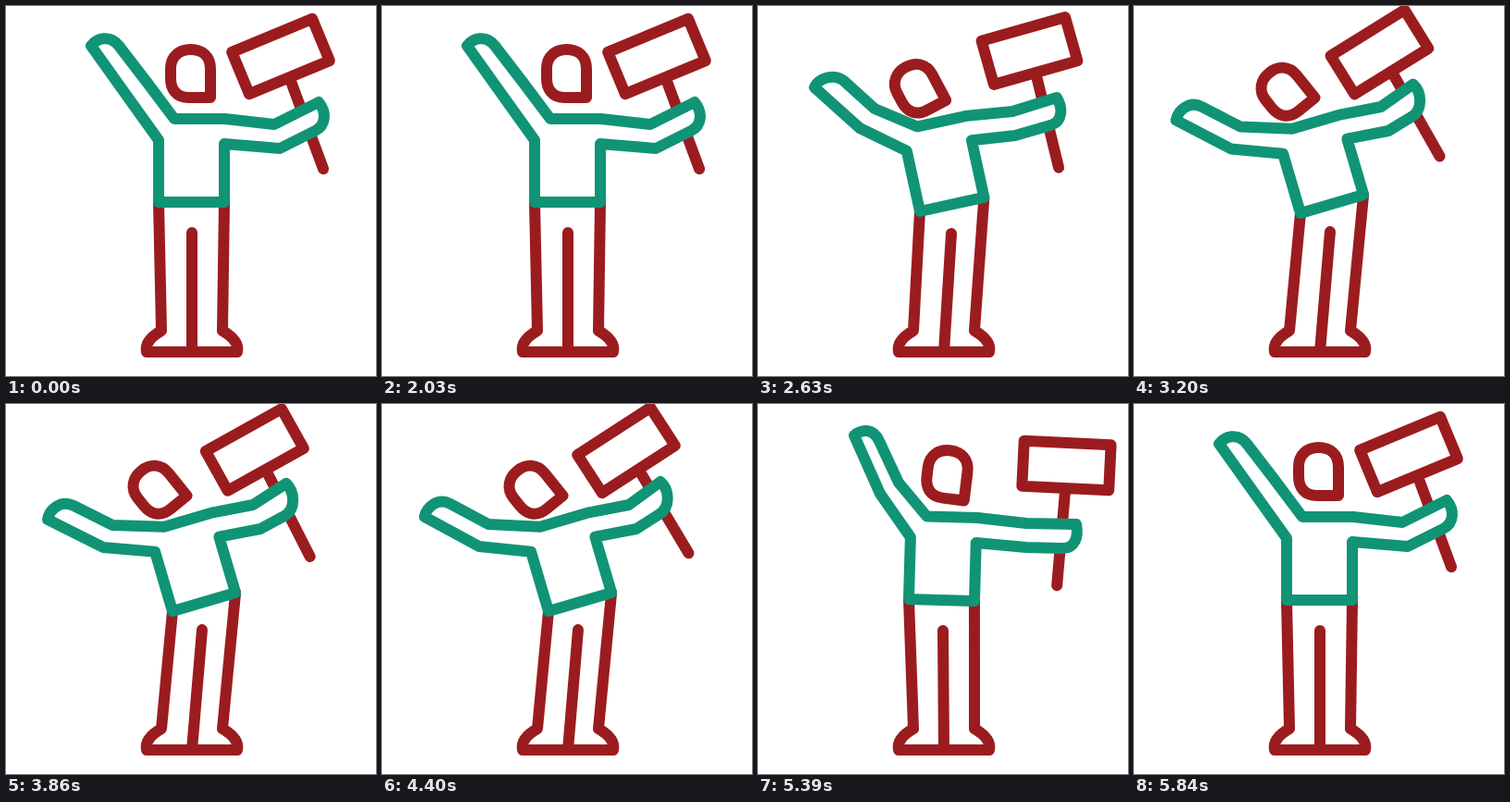
An HTML page that plays this animation: 400x400 px, repeating every 5.87 s.

```html
<!DOCTYPE html>
<html lang="en">
<head>
<meta charset="utf-8">
<title>Protester waving a sign</title>
<style>
  html, body { margin: 0; width: 100%; height: 100%; overflow: hidden; background: #fff; }
  svg { display: block; width: 100vw; height: 100vh; }
  path { fill: none; stroke: #9b1c1f; stroke-width: 12; stroke-linecap: round; stroke-linejoin: round; }
  #shirt { fill: #fff; stroke: #109475; }
</style>
</head>
<body>
<svg viewBox="0 0 400 400">
  <path id="sign" d="M-47 -24.5H47V24.5H-47ZM0 25L-4 130"/>
  <path id="legs"/>
  <path id="head" d="M-21.5 -5C-21.5 -19 -11.5 -26 0 -26C12 -26 21.5 -19 21.5 -5V26H-1.5C-15.5 26 -21.5 17 -21.5 5Z"/>
  <path id="shirt"/>
</svg>
<script>
const LOOP = 5870, START = 2030, STEP = 30;
const RAD = Math.PI / 180;
const $ = id => document.getElementById(id);

// body: left waist corner and lean. left/right: lower elbow, lower hand, upper elbow, upper hand.
// sign/head: centre and angle. crotch: top of the line between the legs.
const rest = {
  body: [165, 212, 0],
  left: [[132, 99], [92, 43], [152, 82], [122, 43]],
  right: [[296, 154], [334, 135], [290, 128], [338, 104]],
  sign: [297, 54.5, -22.5], head: [199.5, 73, 0], crotch: [201, 245]
};
const lean = {
  body: [175, 222, -12.3],
  left: [[110, 132], [61, 88], [126, 111], [94, 82]],
  right: [[278, 140], [316, 129], [275, 114], [323, 99]],
  sign: [293.5, 48.5, -15.8], head: [172, 89, -28], crotch: [209, 246]
};
const far = {
  body: [180, 224, -16.4],
  left: [[105, 155], [45, 125], [115, 131], [73, 110]],
  right: [[275, 135], [301, 121], [267, 109], [303, 86]],
  sign: [269, 49.5, -29], head: [162.5, 92.5, -39], crotch: [212, 244]
};
const swing = {
  body: [163, 211, 1.6],
  left: [[132, 97], [104, 34], [152, 85], [131, 40]],
  right: [[290, 155], [329, 156], [290, 129], [344, 130]],
  sign: [333.5, 66.5, 2.8], head: [204.5, 76, 7], crotch: [200, 245]
};
const windUp = { ...rest, body: [167, 213, -2], right: swing.right, sign: [336, 66, 4] };
const wave = {
  ...far,
  left: [[105, 154], [46, 122], [115, 130], [74, 108]],
  right: [[275, 135], [300, 119], [267, 109], [301, 84]],
  sign: [264, 50, -33]
};
const overshoot = { ...swing, sign: [337, 68, 4.5] };

const keys = [
  [START, rest], [2350, windUp], [2630, lean], [2980, far], [3420, wave], [3920, far],
  [4420, wave], [4920, far], [5390, swing], [5460, overshoot], [5840, rest]
].map(([t, pose]) => ({ t, v: flatten(pose) }));

// Torso corners in the leaning frame of the left waist corner.
function torso(x, y, angle) {
  const c = Math.cos(angle * RAD), s = Math.sin(angle * RAD);
  const at = (px, py) => [x + px * c - py * s, y + px * s + py * c];
  return {
    waistL: at(0, 0), waistR: at(71, 0), pitL: at(0, -67), pitR: at(71, -63),
    neckL: at(17, -90), neckR: at(72, -90)
  };
}

function polar(a, b) {
  const dx = b[0] - a[0], dy = b[1] - a[1];
  return [Math.atan2(dy, dx), Math.hypot(dx, dy)];
}

function extend(p, angle, length) {
  return [p[0] + length * Math.cos(angle), p[1] + length * Math.sin(angle)];
}

// Limbs become angle and length, so they turn instead of shrinking.
function flatten({ body, left, right, sign, head, crotch }) {
  const b = torso(...body);
  const arm = (pit, neck, [e1, h1, e2, h2]) =>
    [polar(pit, e1), polar(e1, h1), polar(neck, e2), polar(e2, h2)].flat();
  return [...body, ...sign, ...head, ...crotch,
    ...arm(b.pitL, b.neckL, left), ...arm(b.pitR, b.neckR, right)];
}

// Smooth curve through the keys that rests at every turning point.
const slope = (k, i) => (keys[k + 1].v[i] - keys[k].v[i]) / (keys[k + 1].t - keys[k].t);
function tangent(k, i) {
  if (k === 0 || k === keys.length - 1) return 0;
  const a = slope(k - 1, i), b = slope(k, i);
  return a * b > 0 ? 2 * a * b / (a + b) : 0;
}

function sample(t) {
  if (t <= keys[0].t) return keys[0].v;
  const k = keys.findIndex(key => key.t >= t) - 1;
  if (k < 0) return keys[keys.length - 1].v;
  const a = keys[k], b = keys[k + 1], d = b.t - a.t, u = (t - a.t) / d;
  const h = u * u * (3 - 2 * u);
  return a.v.map((v, i) => v + (b.v[i] - v) * h
    + d * u * (1 - u) * ((1 - u) * tangent(k, i) - u * tangent(k + 1, i)));
}

const pt = p => p[0].toFixed(2) + ' ' + p[1].toFixed(2);
const place = (id, [x, y, r]) => $(id).setAttribute('transform', `translate(${x} ${y}) rotate(${r})`);

function arm(pit, neck, v) {
  const e1 = extend(pit, v[0], v[1]), e2 = extend(neck, v[4], v[5]);
  return { e1, h1: extend(e1, v[2], v[3]), e2, h2: extend(e2, v[6], v[7]), low: v[2], high: v[6] };
}

// Offset along a forearm and clockwise across it.
const offset = (p, angle, along, across) => extend(extend(p, angle, along), angle + Math.PI / 2, across);

function draw(t) {
  const v = sample(t);
  const b = torso(...v.slice(0, 3));
  place('sign', v.slice(3, 6));
  place('head', v.slice(6, 9));
  $('legs').setAttribute('d', `M${pt(b.waistL)}L168 351C156 358 150 365 152 374H250C252 365 246 358 234 351L${pt(b.waistR)}`
    + `M${pt(v.slice(9, 11))}L201 374`);

  const l = arm(b.pitL, b.neckL, v.slice(11, 19));
  const r = arm(b.pitR, b.neckR, v.slice(19, 27));
  const line = (...points) => points.map(pt).join('L');
  const curve = (...points) => 'C' + points.map(pt).join(' ');
  $('shirt').setAttribute('d',
    'M' + line(b.waistL, b.pitL, l.e1, l.h1)
    + curve(offset(l.h1, l.low, 3, 9.5), offset(l.h2, l.high, 16, 0), l.h2)
    + 'L' + line(l.e2, b.neckL, b.neckR, r.e2, r.h2)
    + curve(offset(r.h2, r.high, 3, 13), offset(r.h1, r.low, 14, 0), r.h1)
    + 'L' + line(r.e1, b.pitR, b.waistR) + 'Z');
}

function tick() {
  const t = performance.now() % LOOP;
  draw(START + Math.floor((t - START) / STEP) * STEP);
  requestAnimationFrame(tick);
}
tick();
</script>
</body>
</html>
```
